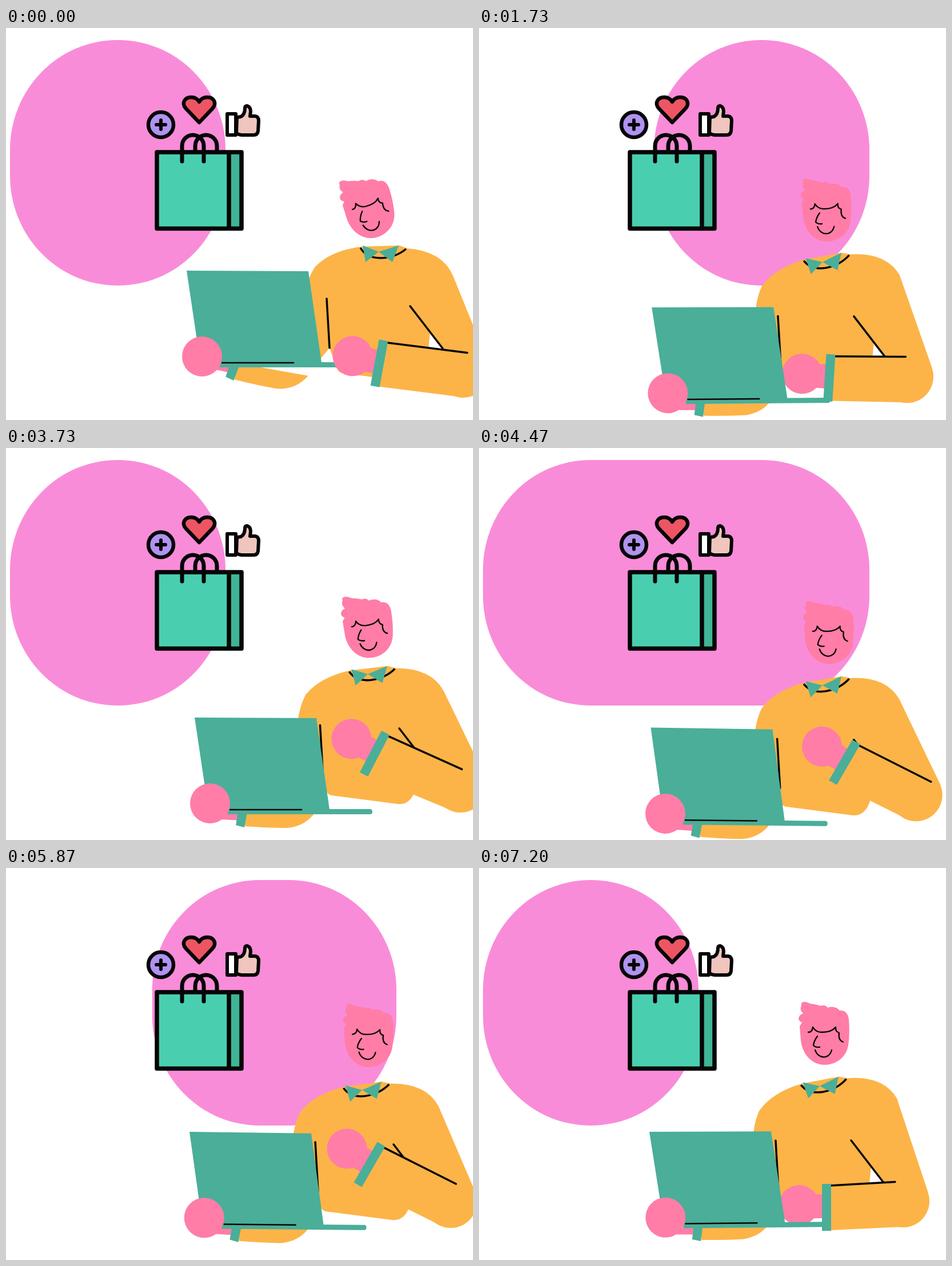
An HTML page with a canvas that plays this animation: 817x685 px, repeating every 7260 ms.

```html
<!DOCTYPE html>
<html lang="en">
<head>
<meta charset="utf-8">
<title>Online shopper</title>
<style>
html, body { margin: 0; width: 100%; height: 100%; overflow: hidden; background: #fff; }
canvas { display: block; }
</style>
</head>
<body>
<canvas id="stage" width="817" height="685"></canvas>
<script>
const ctx = document.getElementById('stage').getContext('2d');
const LOOP = 7260, BOB = 1860, BLOB = 3630;
const PINK = '#f98cd8', SKIN = '#ff7da7', YELLOW = '#fcb448', TEAL = '#4aae99', BLACK = '#050505';

// Pose: bow x, y, turn | head x, y, turn | laptop x, y, turn | cuff x, y, turn | elbow x, y | left arm turn
const start = [652, 391, 0, 633, 314, -13, 316, 424, 0, 653, 586, 10.5, 800, 600, 10];
const low   = [598, 418, -8, 608, 327, 0, 298, 492, 0.6, 640, 553, 30, 763, 609, 0];
const rise  = [633, 395, -5, 632, 313, -5, 330, 471, 0, 645, 534, 27.5, 795, 591, 0];
const lift  = [623, 388, -6, 633, 294, 1, 321, 461, 0.5, 636, 518, 30, 778, 583, 0];
const lean  = [596, 381, -9, 614, 277, 7, 296, 454, 0.6, 584, 549, 15.5, 748, 576, -3];
const type  = [596, 381, -9, 603, 290, 0, 298, 461, -0.5, 608, 593, 0, 742, 582, -3];
const dip   = type.map((v, i) => [1, 4, 7, 10, 13].includes(i) ? v + 30 : v);

const cycle = [[10, rise], [290, lift], [870, low], [910, low], [1410, lean], [1620, type], [1690, dip]];
const keys = [[0, start], [270, start], [450, lift]];
for (let k = 0; k < 4; k++)
  for (const [at, pose] of cycle) {
    const time = at + k * BOB;
    if (time > 450 && time <= 7200) keys.push([time, pose]);
  }
keys.push([LOOP, type]);

const smooth = u => u * u * (3 - 2 * u);
const quart = u => u < 0.5 ? 8 * u ** 4 : 1 - 8 * (1 - u) ** 4;
const ramp = (t, from) => quart(Math.min(1, Math.max(0, (t - from) / 620)));
const rad = deg => deg * Math.PI / 180;

function poseAt(t) {
  const i = keys.findIndex(key => key[0] > t);
  const [t0, a] = keys[i - 1], [t1, b] = keys[i];
  const u = smooth((t - t0) / (t1 - t0));
  return a.map((v, j) => v + (b[j] - v) * u);
}

// Maps local points to the stage
const frame = (x, y, turn) => {
  const c = Math.cos(rad(turn)), s = Math.sin(rad(turn));
  return (px, py) => [x + px * c - py * s, y + px * s + py * c];
};

function within(x, y, turn, draw) {
  ctx.save();
  ctx.translate(x, y);
  ctx.rotate(rad(turn));
  draw();
  ctx.restore();
}

function fill(path, color) {
  ctx.fillStyle = color;
  ctx.fill(new Path2D(path));
}

function stroke(path, width, color = BLACK, cap = 'round') {
  ctx.strokeStyle = color;
  ctx.lineWidth = width;
  ctx.lineCap = cap;
  ctx.lineJoin = 'round';
  ctx.stroke(new Path2D(path));
}

function outlined(path, color, width = 6.5) {
  fill(path, color);
  stroke(path, width);
}

function disc(x, y, r, color) {
  ctx.fillStyle = color;
  ctx.beginPath();
  ctx.arc(x, y, r, 0, Math.PI * 2);
  ctx.fill();
}

const poly = (...points) => 'M' + points.join('L') + 'Z';

function drawBlob(t) {
  const left = 7 + 299 * (ramp(t, 1035) - ramp(t, 2005));
  const right = 384 + 299 * (ramp(t, 190) - ramp(t, 2820));
  ctx.fillStyle = PINK;
  ctx.beginPath();
  ctx.roundRect(left, 21, right - left, 429, { x: 188, y: 192 });
  ctx.fill();
}

function drawBag() {
  fill('M264 217H390V350H264Z', '#49cfb0');
  fill('M390 217H412V350H390Z', '#3fb596');
  stroke('M264 217H412V350.500H264ZM390 217V350', 7.5);
  stroke('M308 233V206A19 19 0 0 1 346 206V233M331 217V206A19 19 0 0 1 369 206V217', 7);
}

function drawIcons() {
  outlined('M249 169a22 22 0 1 0 44 0a22 22 0 1 0 -44 0', '#b092f0');
  stroke('M263 169H279M271 161V177', 6);
  outlined('M338 165L315 141C306 131 313 121 324 121C331 121 335 124 338 129' +
           'C341 124 345 121 352 121C363 121 370 131 361 141Z', '#ed5564');
  outlined('M387 150H402V187H387Z', '#fff', 6);
  outlined('M404 156L411 155Q418 151 418 140Q418 136 422 136Q428 138 428 146L427 154H436' +
           'Q442 155 442 162L441 180Q440 187 433 187H412Q407 187 403 183Z', '#efc5bd', 6);
}

function drawHead() {
  fill('M-39 -50C-41 -58 -30 -57 -24 -53Q-14 -52 -5 -49Q2 -52 7 -46Q20 -50 28 -41Q42 -42 44 -25' +
       'Q46 0 43 20C39 43 19 54 2 54C-21 54 -37 35 -40 12L-42 -14Q-39 -18 -38 -20Q-47 -24 -42 -32Q-39 -35 -36 -36Q-43 -42 -39 -50Z', SKIN);
  stroke('M-27 -3Q-20 -3 -19 -12Q-14 -3 -3 -3Q14 -3 21 -12Q20 -4 27 -2Q25 11 34 14' +
         'M-11 4Q-17 12 -18 20Q-14 24 -7 23M-15 28C-10 44 10 45 14 28', 2.3);
}

function drawMan(t) {
  const [cx, cy, bodyTurn, hx, hy, headTurn, lx, ly, lapTurn, kx, ky, cuffTurn, ex, ey, armTurn] = poseAt(t);
  const chest = frame(cx, cy, bodyTurn), waist = frame(cx, cy, 0);
  const lap = frame(lx, ly, lapTurn), cuff = frame(kx, ky, cuffTurn);
  const [sideX, sideY] = chest(-91, 82);
  const sideEnd = [sideX + 5, sideY + 86];

  within(hx, hy, headTurn, drawHead);

  // Left arm, reaching under the laptop
  fill(poly(chest(-111, 26), chest(-132, 85), lap(160, 165), lap(225, 165), sideEnd, chest(-60, 60)), YELLOW);
  within(...lap(84, 165), lapTurn + armTurn, () => {
    fill('M4 -4L4 25Q45 28 78 28Q112 25 130 -4Z', YELLOW);
    stroke('M-38 7L0 9', 12, SKIN, 'butt');
    fill('M-8 0L8 0L3 27L-12 23Z', TEAL);
  });

  // Torso with right upper arm
  fill(`M${chest(-132, 85)}Q${chest(-126, 48)} ${chest(-111, 26)}Q${chest(-84, -2)} ${chest(-30, -9)}` +
       `L${chest(36, -11)}L${chest(50, -6)}Q${chest(112, -1)} ${chest(130, 42)}` +
       `L${[ex + 43, ey - 17]}L${[ex - 20, ey + 10]}L${waist(112, 169)}L${waist(90, 140)}` +
       `L${waist(84, 200)}Q${waist(75, 230)} ${waist(52, 227)}L${waist(-64, 212)}` +
       `Q${waist(-70, 211)} ${waist(-74, 202)}L${sideEnd}L${[sideX, sideY]}Z`, YELLOW);
  stroke(`M${waist(55, 95)}L${waist(112, 169)}`, 3.5);
  stroke(`M${[sideX, sideY]}L${sideEnd}`, 3.5);
  within(cx, cy, bodyTurn, () => {
    stroke('M-32 -7Q-22 11 4 11Q30 10 48 -5', 3.5, BLACK, 'butt');
    fill('M0 0L-28 -11L-23 18ZM0 0L35 -11L24 18Z', TEAL);
  });

  const drawHand = () => within(kx, ky, cuffTurn, () => {
    stroke('M-45 -2L0 -2', 42, SKIN, 'butt');
    disc(-48, -4, 35, SKIN);
  });
  const handInFront = t < 450;
  if (!handInFront) drawHand();

  within(lx, ly, lapTurn, () => {
    fill('M0 0L213 1L236 161H24Z', TEAL);
    fill('M58 160H307Q311 160 311 164.500Q311 169 307 169H58Z', TEAL);
    stroke('M62 161H187', 2.5);
    disc(27, 150, 35, SKIN);
  });

  // Right forearm; its crease lengthens as the arm lifts
  const slope = Math.atan2(ey - ky, ex - kx);
  const under = [ex - 45 * Math.sin(slope), ey + 45 * Math.cos(slope)];
  const crease = Math.min(148, 120 + 3 * cuffTurn);
  disc(ex, ey, 46, YELLOW);
  fill(poly(cuff(6, -38), cuff(120, -44), [ex, ey], under, cuff(6, 40)), YELLOW);
  stroke(`M${cuff(6, -38)}L${cuff(crease, -38 - crease * 0.055)}`, 3.5);
  if (handInFront) drawHand();
  stroke(`M${cuff(0, -41)}L${cuff(0, 41)}`, 16, TEAL, 'butt');
}

function render(now) {
  const t = now % LOOP;
  ctx.fillStyle = '#fff';
  ctx.fillRect(0, 0, 817, 685);
  drawBlob(t % BLOB);
  drawBag();
  drawIcons();
  drawMan(t);
}

const begin = performance.now();
function tick() {
  render(performance.now() - begin);
  requestAnimationFrame(tick);
}
tick();
</script>
</body>
</html>
```
